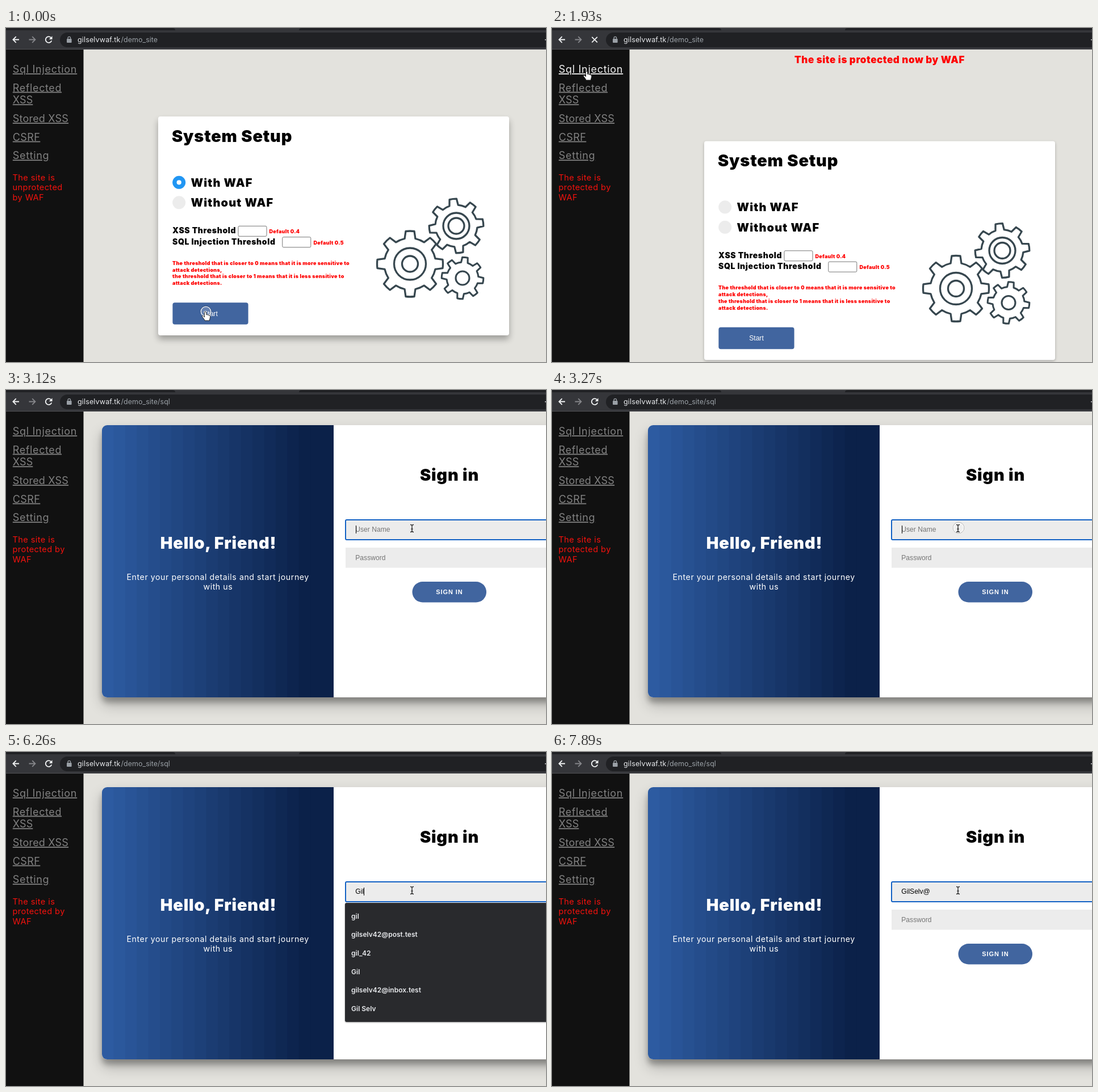
These frames come from a looping animation (951 by 589 pixels, 8 s). An HTML page:

```html
<!DOCTYPE html>
<html lang="en">
<head>
<meta charset="utf-8">
<title>Firewall demo</title>
<style>
  html, body { margin: 0; width: 100%; height: 100%; overflow: hidden; background: #e3e2dd; }
  svg { display: block; width: 951px; height: 589px; }
  text { font-family: Inter, "Open Sans", sans-serif; white-space: pre; }
  .link { font-size: 18px; fill: #818181; text-decoration: underline; }
  .link.hover { fill: #f1f1f1; }
  .status { font-size: 14.6px; fill: #f4120d; letter-spacing: .4px; }
  .heavy { font-weight: 900; }
  .title { font-size: 29px; letter-spacing: .78px; }
  .option { font-size: 20px; letter-spacing: 1.1px; }
  .label { font-size: 14px; letter-spacing: .6px; }
  .note { font-size: 9px; letter-spacing: .29px; fill: #f00; }
  .lead { font-size: 14.2px; letter-spacing: .55px; fill: #fff; }
  .form { font-family: "Liberation Sans", Arial, sans-serif; font-size: 12.1px; }
  .hint { fill: #757575; }
  .row { font-size: 12px; font-weight: 600; fill: #e8eaed; }
  .mid { text-anchor: middle; }
  .icon { fill: none; stroke: #f1f3f4; stroke-width: 1.8; }
  .gear { fill: none; stroke: #37474f; stroke-linejoin: round; }
</style>
</head>
<body>
<svg viewBox="0 0 951 589">
  <defs>
    <clipPath id="cardClip"><rect x="169" y="62" width="820" height="480" rx="9"/></clipPath>
  </defs>
  <rect width="951" height="589" fill="#e3e2dd"/>

  <g id="setup">
    <text id="banner" class="heavy mid" x="577" y="62" font-size="17" letter-spacing=".55" fill="#f00">The site is protected now by WAF</text>
    <g id="panel">
      <rect id="shade" x="268" width="618" height="386" rx="4"/>
      <rect x="268" y="156" width="618" height="386" rx="4" fill="#fff"/>
      <text class="heavy title" x="292" y="200.5">System Setup</text>
      <circle id="radio" cx="304.7" cy="272.3" r="11.5"/>
      <circle id="dot" cx="304.7" cy="272.3" r="4.1" fill="#fff"/>
      <circle cx="304.7" cy="307.8" r="11.5" fill="#ececec"/>
      <text class="heavy option" x="325.5" y="279.8">With WAF</text>
      <text class="heavy option" x="325.5" y="315.3">Without WAF</text>
      <text class="heavy label" x="293" y="362">XSS Threshold</text>
      <text class="heavy label" x="293" y="381.5">SQL Injection Threshold</text>
      <g fill="#fff" stroke="#767676">
        <rect x="409" y="349.3" width="50" height="18" rx="2"/>
        <rect x="486.8" y="368.7" width="50" height="18" rx="2"/>
      </g>
      <g class="heavy note">
        <text x="463.5" y="362.2">Default 0.4</text>
        <text x="541.5" y="381.5">Default 0.5</text>
        <text x="293" y="417.6">The threshold that is closer to 0 means that it is more sensitive to</text>
        <text x="293" y="429.5">attack detections,</text>
        <text x="293" y="441.3">the threshold that is closer to 1 means that it is less sensitive to</text>
        <text x="293" y="453.1">attack detections.</text>
      </g>
      <rect x="293.4" y="484.2" width="133.2" height="38.5" rx="4" fill="#41659f"/>
      <text class="form mid" x="360" y="507.5" fill="#fff">Start</text>
      <g id="gears"></g>
    </g>
  </g>

  <g id="login">
    <rect x="169" y="75" width="820" height="480" rx="9" opacity=".25" style="filter:blur(12px)"/>
    <rect x="169" y="71" width="820" height="480" rx="9" opacity=".24" style="filter:blur(4.6px)"/>
    <g clip-path="url(#cardClip)">
      <rect x="169" y="62" width="820" height="480" fill="#fff"/>
      <g id="bands"></g>
    </g>
    <text class="heavy title mid" x="374" y="280" fill="#fff">Hello, Friend!</text>
    <text class="lead mid" x="373.2" y="334.5">Enter your personal details and start journey</text>
    <text class="lead mid" x="373.4" y="351.7">with us</text>
    <text class="heavy title mid" x="781" y="160">Sign in</text>
    <rect x="598" y="229" width="380" height="35" rx="2" fill="#ececec" stroke="#1261c4" stroke-width="2"/>
    <text id="field" class="form" x="615.3" y="250"></text>
    <rect id="caret" y="239" width="1" height="14"/>
    <rect x="598" y="278" width="380" height="35.5" fill="#ececec"/>
    <text class="form hint" x="615.3" y="300">Password</text>
    <rect x="715.5" y="338" width="130.5" height="36.5" rx="18.2" fill="#41659f"/>
    <text class="form mid" x="781" y="360" fill="#fff" style="font-size:11px;font-weight:700;letter-spacing:.92px">SIGN IN</text>
    <g id="menu">
      <rect id="menuShade" x="597" y="267" width="380" rx="3" opacity=".4" style="filter:blur(1.2px)"/>
      <rect id="menuBox" x="597" y="266" width="380" rx="3" fill="#292a2d"/>
      <g id="rows"></g>
    </g>
  </g>

  <rect y="37" width="136.5" height="552" fill="#111"/>
  <text id="sqlLink" class="link" x="11.8" y="79" letter-spacing=".7">Sql Injection</text>
  <text class="link" x="11.8" y="111.5" letter-spacing=".6">Reflected</text>
  <text class="link" x="11.8" y="133.3" letter-spacing=".1">XSS</text>
  <text class="link" x="11.8" y="166" letter-spacing=".2">Stored XSS</text>
  <text class="link" x="11.8" y="198.6" letter-spacing=".4">CSRF</text>
  <text class="link" x="11.8" y="231.3" letter-spacing=".65">Setting</text>
  <g id="status" class="status">
    <text x="11.5" y="269.2">The site is</text>
    <text x="11.5" y="286.4"></text>
    <text x="11.5" y="303.6"></text>
  </g>

  <rect width="951" height="38" fill="#35363a"/>
  <path d="M0 0H293Q298 0 298 4H0ZM951 0H521Q516 0 516 4H951Z" fill="#202124"/>
  <rect y="37" width="951" height="1" fill="#505155"/>
  <rect x="95" y="8" width="880" height="26" rx="13" fill="#202124"/>
  <path class="icon" d="M23 20.5H13M17.7 15.2L12.4 20.5L17.7 25.8"/>
  <path class="icon" d="M40.5 20.5H51M46.2 15.2L51.5 20.5L46.2 25.8" style="stroke:#85868a"/>
  <g id="reload">
    <path class="icon" d="M79.4 17.2A5.4 5.4 0 1 0 80.3 22.2"/>
    <path d="M81.5 14.3V20H75.8Z" fill="#f1f3f4"/>
  </g>
  <path id="stop" class="icon" d="M70.3 15.8L79.8 25.3M79.8 15.8L70.3 25.3"/>
  <rect x="107" y="19" width="8.6" height="7" rx="1" fill="#9aa0a6"/>
  <path d="M109 19.5V17.7A2.3 2.3 0 0 1 113.6 17.7V19.5" fill="none" stroke="#9aa0a6" stroke-width="1.3"/>
  <text x="126" y="25" font-size="12.5" letter-spacing=".15" fill="#e8eaed">gilselvwaf.tk</text>
  <text id="path" x="202.6" y="25" font-size="12.5" fill="#9aa0a6"></text>
  <rect x="949" y="20" width="2" height="1.4" fill="#d0d2d5"/>

  <g id="pointer">
    <g id="ring">
      <circle cx="1" cy="-1" r="9.7" fill="none" stroke="#000" stroke-opacity=".35" stroke-width=".8"/>
      <circle cx="1" cy="-1" r="8.7" fill="#fff" fill-opacity=".2" stroke="#fff" stroke-width="1.3"/>
    </g>
    <path id="hand" fill="#fff" stroke="#222" d="M-1.6 .5C-1.6-1.2 1.4-1.2 1.5 .5L2 5c.8-1 2.4-.6 2.6.3c.8-.6 2-.2 2.3.8c1-.4 1.8.3 1.8 1.4c0 3-1 4-1.3 7.5H-1C-1.5 12.5-4 10.5-5.5 8c-.6-1.3 1-2.2 2.2-1l1.8 1.8z"/>
    <path id="arrow" stroke="#fff" d="M0 0V13l3-2.8l2 4.6l2.2-1l-2-4.5h4.2z"/>
    <path id="beam" fill="none" stroke="#222" stroke-width="1.3" d="M-3-6.5q3 0 3 2V4.5q0 2-3 2M3-6.5q-3 0-3 2M0 4.5q0 2 3 2M-1.7 1.2H1.7"/>
  </g>
</svg>
<script>
const LOOP = 8000, STEP = 150;
const $ = id => document.getElementById(id);
const show = (id, on) => { $(id).style.display = on ? '' : 'none'; };
const within = (t, a, b) => t >= a && t < b;
const mix = (a, b, p) => a + (b - a) * p;
const smooth = p => p * p * (3 - 2 * p);

// Closed gear outline: arcs at the root radius, straight-sided teeth.
function gear(cx, cy, tip, root, turn, width, hubs) {
  const at = (r, deg) => {
    const a = deg * Math.PI / 180;
    return `${(cx + r * Math.cos(a)).toFixed(2)} ${(cy + r * Math.sin(a)).toFixed(2)}`;
  };
  let d = '';
  for (let k = 0; k < 8; k++) {
    const c = turn + k * 45;
    d += (k ? `A${root} ${root} 0 0 1 ` : 'M') + at(root, c - 12);
    d += `L${at(tip, c - 7.5)}A${tip} ${tip} 0 0 1 ${at(tip, c + 7.5)}L${at(root, c + 12)}`;
  }
  d += `A${root} ${root} 0 0 1 ${at(root, turn - 12)}Z`;
  const rings = hubs.map(r => `<circle cx="${cx}" cy="${cy}" r="${r}"/>`).join('');
  return `<g class="gear" stroke-width="${width}"><path d="${d}"/>${rings}</g>`;
}
$('gears').innerHTML =
  gear(711.5, 416, 58, 45.5, 0, 3.3, [28, 14]) +
  gear(793, 349, 47.8, 37, -7, 3.3, [23, 14]) +
  gear(804, 441, 36.8, 28, 7, 3.1, [12]);

const BANDS = 20, BAND = 408 / BANDS;
$('bands').innerHTML = Array.from({ length: BANDS }, (_, i) => {
  const p = Math.min(1, i / 17);
  const rgb = [mix(45, 11, p), mix(91, 33, p), mix(161, 73, p)].map(Math.round);
  return `<rect x="${169 + i * BAND}" y="62" width="${i < BANDS - 1 ? BAND + 1 : BAND}" height="480" fill="rgb(${rgb})"/>`;
}).join('');

const menus = [
  ['orlit', 'guest', 'demo7@post.test', 'a', 'qwe', 'demo7'],
  ['gil', 'gilselv42@post.test', 'gil_42', 'Gil', 'gilselv42@inbox.test', 'Gil Selv'],
  ['gilselv42@post.test', 'gilselv42@inbox.test', 'GilSelv']
];
$('rows').innerHTML = menus[0].map((_, i) =>
  `<text class="row" x="608" y="${293.8 + i * 32.6}"></text>`).join('');

const typed = 'GilSelv@';
const keys = [4910, 5060, 5210, 6550, 6700, 6850, 7000, 7450];
const caretOn = [[2080, 2520], [3120, 3570], [4010, 4610], [4910, 5810], [6260, 7890]];
const clicks = [[0, 290], [1780, 1930], [3270, 3420]];
const loading = [[290, 440], [1930, 2080]];
const any = (spans, t) => spans.some(([a, b]) => within(t, a, b));

const stops = { button: [351, 501], link: [61, 77], input: [715, 244] };

// Progress of a move that advances in hard steps.
function travel(t, start, count) {
  const k = Math.floor((t - start) / STEP) + 1;
  return smooth(Math.max(0, Math.min(1, k / count)));
}

function drawPointer(t) {
  const toLink = travel(t, 1030, 5), toInput = travel(t, 2370, 4);
  const from = toInput ? stops.link : stops.button;
  const to = toInput ? stops.input : stops.link;
  const p = toInput || toLink;
  const [x, y] = [0, 1].map(i => mix(from[i], to[i], p));
  $('pointer').setAttribute('transform', `translate(${x.toFixed(1)} ${y.toFixed(1)})`);
  const overLink = !toInput && (p === 0 || p > .85);
  const shape = toInput === 1 ? 'beam' : overLink ? 'hand' : 'arrow';
  for (const id of ['hand', 'arrow', 'beam']) show(id, id === shape);
  show('ring', any(clicks, t));
  $('sqlLink').classList.toggle('hover', toLink === 1 && !toInput);
}

function drawSetup(t) {
  const saved = t >= 440;
  show('banner', saved);
  show('dot', !saved);
  $('panel').setAttribute('transform', `translate(0 ${saved ? 43.5 : 0})`);
  $('radio').setAttribute('fill', saved ? '#ececec' : '#2196f3');
  $('shade').setAttribute('y', saved ? 158 : 163);
  $('shade').style.cssText = saved ? 'filter:blur(2.5px);opacity:.25' : 'filter:blur(6px);opacity:.3';
  const lines = saved ? ['protected by', 'WAF'] : ['unprotected', 'by WAF'];
  lines.forEach((line, i) => { $('status').children[i + 1].textContent = line; });
}

function drawLogin(t) {
  const count = keys.filter(k => t >= k).length;
  const field = $('field');
  field.textContent = typed.slice(0, count);
  const length = count ? field.getComputedTextLength() : 0;
  $('caret').setAttribute('x', Math.round(615.5 + length));
  show('caret', any(caretOn, t));
  if (!count) field.textContent = 'User Name';
  field.classList.toggle('hint', !count);

  show('menu', within(t, 3420, 7450));
  const items = menus[count > 3 ? 2 : count ? 1 : 0];
  const height = items.length * 32.6 + 14.5;
  $('menuBox').setAttribute('height', height);
  $('menuShade').setAttribute('height', height);
  [...$('rows').children].forEach((row, i) => { row.textContent = items[i] || ''; });
}

function draw(t) {
  const signIn = t >= 2080, busy = any(loading, t);
  show('setup', !signIn);
  show('login', signIn);
  show('reload', !busy);
  show('stop', busy);
  $('path').textContent = signIn ? '/demo_site/sql' : '/demo_site';
  drawSetup(t);
  drawLogin(t);
  drawPointer(t);
}

const begin = performance.now();
function tick() {
  draw((performance.now() - begin) % LOOP);
  requestAnimationFrame(tick);
}
tick();
</script>
</body>
</html>
```
